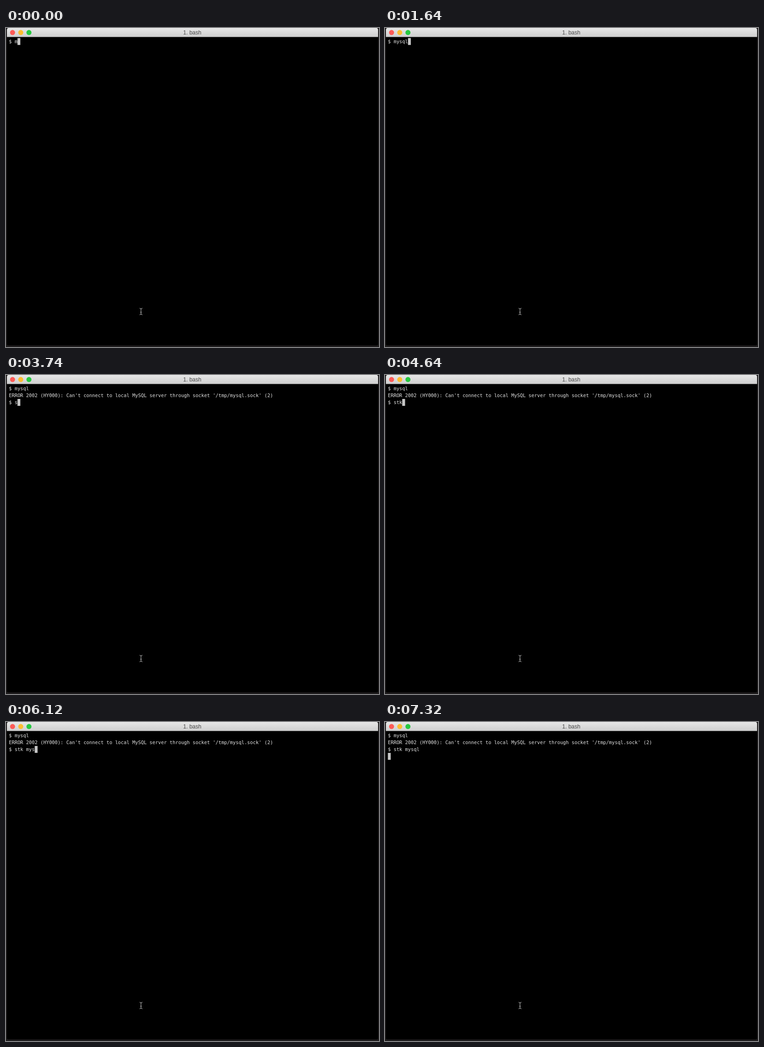
These frames come from a looping animation (809 by 692 pixels, 8000 ms). An HTML page with a canvas:

```html
<!DOCTYPE html>
<html lang="en">
<head>
<meta charset="utf-8">
<title>Terminal</title>
<style>
  html, body { margin: 0; width: 100%; height: 100%; overflow: hidden; background: #1d1b1c; }
  canvas { display: block; }
</style>
</head>
<body>
<canvas id="stage" width="809" height="692"></canvas>
<script>
const ctx = document.getElementById('stage').getContext('2d');
const LOOP = 8000;
const CELL = 6.228, LEFT = 6.2, TOP = 21.8, LINE = 15.07;
const PROMPT = '$ ';
const ERROR = "ERROR 2002 (HY000): Can't connect to local MySQL server through socket '/tmp/mysql.sock' (2)";

// Each command lists the moment every key appears, then the moment of Enter.
const first = { text: 'mysql', keys: [0, 450, 1040, 1340, 1640], enter: 2240 };
const second = {
  text: 'stk mysql',
  keys: [3740, 4190, 4640, 5080, 5680, 5980, 6120, 6420, 6720],
  enter: 7320
};

function typed(command, t) {
  return PROMPT + command.text.slice(0, command.keys.filter(k => k <= t).length);
}

function screenLines(t) {
  const lines = [typed(first, t)];
  if (t >= first.enter) lines.push(ERROR, typed(second, t));
  if (t >= second.enter) lines.push('');
  return lines;
}

function drawWindow() {
  ctx.fillStyle = '#1d1b1c';
  ctx.fillRect(0, 0, 809, 692);

  ctx.fillStyle = '#000';
  ctx.beginPath();
  ctx.roundRect(2, 0, 805, 688.5, [4, 4, 3, 3]);
  ctx.fill();

  const bar = ctx.createLinearGradient(0, 0, 0, 19.5);
  bar.addColorStop(0, '#ebebeb');
  bar.addColorStop(0.1, '#e4e4e4');
  bar.addColorStop(1, '#cecece');
  ctx.fillStyle = bar;
  ctx.beginPath();
  ctx.roundRect(2, 0, 805, 19.5, [4, 4, 0, 0]);
  ctx.fill();

  ['#fc5b57', '#fdbd30', '#28c941'].forEach((color, i) => {
    ctx.fillStyle = color;
    ctx.beginPath();
    ctx.arc(14.2 + i * 17.8, 9.8, 5.5, 0, Math.PI * 2);
    ctx.fill();
  });

  ctx.fillStyle = '#484848';
  ctx.font = '12px "Liberation Sans", Arial, sans-serif';
  ctx.textAlign = 'center';
  ctx.fillText('1. bash', 404, 14);
}

function drawText(lines) {
  ctx.font = '10.35px "DejaVu Sans Mono", monospace';
  ctx.textAlign = 'left';
  ctx.fillStyle = '#e2e2e2';
  lines.forEach((line, row) => {
    const y = Math.round(TOP + row * LINE + 11.2);
    [...line].forEach((ch, col) => ctx.fillText(ch, LEFT + col * CELL, y));
  });

  const row = lines.length - 1;
  ctx.fillStyle = '#c6c6c6';
  ctx.fillRect(LEFT + lines[row].length * CELL, TOP + row * LINE, CELL, 15);
}

function drawPointer() {
  ctx.strokeStyle = '#c8c8c8';
  ctx.lineWidth = 1;
  ctx.beginPath();
  ctx.moveTo(289.8, 607.8);
  ctx.quadraticCurveTo(292.8, 608, 292.8, 610.5);
  ctx.lineTo(292.8, 619.5);
  ctx.quadraticCurveTo(292.8, 622, 289.8, 622.2);
  ctx.moveTo(295.8, 607.8);
  ctx.quadraticCurveTo(292.8, 608, 292.8, 610.5);
  ctx.moveTo(292.8, 619.5);
  ctx.quadraticCurveTo(292.8, 622, 295.8, 622.2);
  ctx.moveTo(291.3, 616.5);
  ctx.lineTo(294.3, 616.5);
  ctx.stroke();
}

const start = performance.now();

function frame() {
  drawWindow();
  drawText(screenLines((performance.now() - start) % LOOP));
  drawPointer();
  requestAnimationFrame(frame);
}
frame();
</script>
</body>
</html>
```
